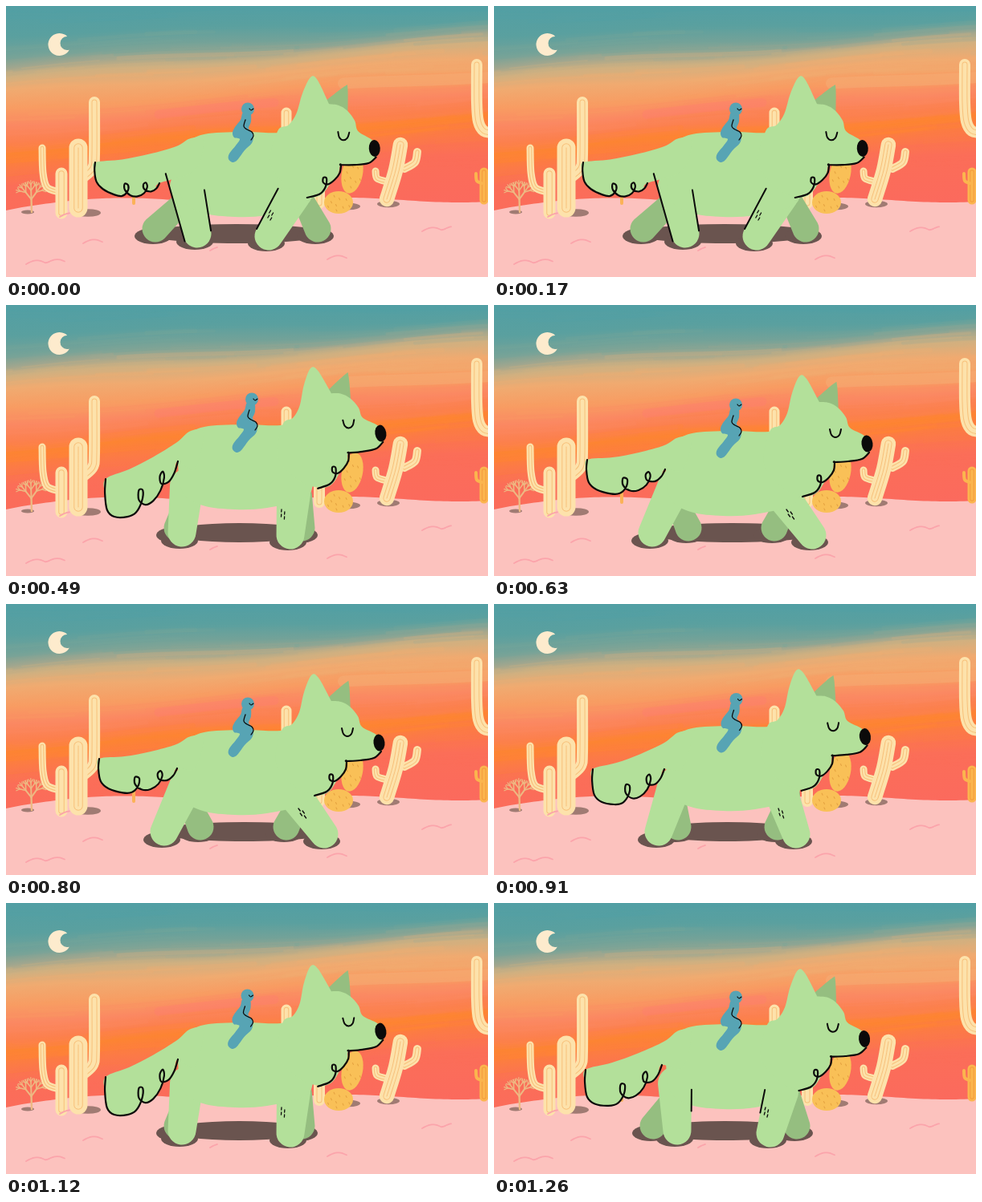
Write an HTML page with a canvas that moves like this. It is 600x338 px and loops after 1470 ms.

```html
<!DOCTYPE html>
<html lang="en">
<head>
<meta charset="utf-8">
<title>Desert ride</title>
<style>
html, body { margin: 0; height: 100%; overflow: hidden; background: #fcc2be; }
canvas { display: block; width: 100vw; height: 100vh; }
</style>
</head>
<body>
<canvas id="stage"></canvas>
<script>
const W = 600, H = 338;
const GREEN = '#b3e09a', SHADE = '#95be80', INK = '#0b0a0a', SHADOW = '#6a544f', BLUE = '#57a4b4';
const CREAM = '#fde2ab', LINE = '#f7c07a', YELLOW = '#f9c057', GROUND = '#fcc2be', PINK = '#fba4ab';
const ratio = window.devicePixelRatio || 1;

function prepare(canvas) {
  canvas.width = W * ratio;
  canvas.height = H * ratio;
  const c = canvas.getContext('2d');
  c.scale(ratio, ratio);
  c.lineCap = c.lineJoin = 'round';
  return c;
}
const backdrop = document.createElement('canvas');
const back = prepare(backdrop), view = prepare(document.getElementById('stage'));
let c = back;

// "x y x y ..." to a list of points
function points(text) {
  const n = text.split(' ').map(Number);
  return n.filter((v, i) => i % 2 === 0).map((x, i) => [x, n[2 * i + 1]]);
}
// Smooth curve through points; a doubled point makes a corner.
function curve(list, closed) {
  const p = typeof list === 'string' ? points(list) : list, path = new Path2D(), n = p.length;
  const at = i => p[closed ? (i + n) % n : Math.max(0, Math.min(n - 1, i))];
  path.moveTo(...p[0]);
  for (let i = 0; i < (closed ? n : n - 1); i++) {
    const [a, b, d, e] = [at(i - 1), at(i), at(i + 1), at(i + 2)];
    path.bezierCurveTo(b[0] + (d[0] - a[0]) / 6, b[1] + (d[1] - a[1]) / 6,
      d[0] - (e[0] - b[0]) / 6, d[1] - (e[1] - b[1]) / 6, d[0], d[1]);
  }
  return path;
}
function fill(list, color) {
  c.fillStyle = color;
  c.fill(curve(list, true));
}
function stroke(list, color, width) {
  c.strokeStyle = color;
  c.lineWidth = width;
  c.stroke(curve(list));
}
function oval(x, y, rx, ry, color, turn = 0) {
  c.fillStyle = color;
  c.beginPath();
  c.ellipse(x, y, rx, ry, turn, 0, 7);
  c.fill();
}
let seed = 7;
function rnd() {
  seed = (seed * 16807) % 2147483647;
  return seed / 2147483647;
}

// Sky colours by height at mid-stage; the bands sink to the left and rise to the right.
const sky = [[0, '#529fa4'], [26, '#5aa09f'], [44, '#74a298'], [56, '#a0a68e'], [68, '#d0b080'],
  [86, '#f0aa70'], [108, '#f89c62'], [127, '#fb8862'], [146, '#fc804e'], [160, '#fd8432'],
  [181, '#fc7a46'], [206, '#fb6e58'], [260, '#fb6a5d']];
const bend = (y, x) => y + 22 * Math.min(1, y / 60) * (1 - 2 * x / W) + 3 * Math.sin(x / 70 + y / 20);

function brush(y, x, length, color, width, alpha) {
  const line = [];
  for (let d = 0; d <= length; d += 12) line.push([x + d, bend(y, x + d)]);
  c.globalAlpha = alpha;
  stroke(line, color, width);
  c.globalAlpha = 1;
}
function paintSky() {
  for (let x = 0; x < W; x += 2) {
    const g = c.createLinearGradient(0, 0, 0, H);
    for (const [y, color] of sky) g.addColorStop(Math.max(0, bend(y, x)) / H, color);
    c.fillStyle = g;
    c.fillRect(x, 0, 2, H);
  }
  for (let i = 0; i < 220; i++) {
    const [y, color] = sky[Math.floor(rnd() * sky.length)];
    brush(y + (rnd() - 0.5) * 26, rnd() * 700 - 100, 60 + rnd() * 180, color, 1.5 + rnd() * 5, 0.25);
  }
  brush(126, 190, 150, '#fc7d6e', 11, 0.4);
  brush(108, 420, 190, '#f3b27a', 14, 0.4);
}

function stem(path, w, color = CREAM, line = LINE) {
  stroke(path, color, w);
  stroke(path, line, w * 0.5);
  stroke(path, color, w * 0.5 - 2);
  if (w > 18) stroke(path, line, 1);
}
function branch(x, y, angle, length, depth) {
  const x2 = x + length * Math.cos(angle), y2 = y + length * Math.sin(angle);
  stroke([[x, y], [x2, y2]], '#edb983', 1.2 + depth * 0.4);
  if (depth) for (const turn of [-0.65, 0, 0.65]) branch(x2, y2, angle + turn, length * 0.68, depth - 1);
}
function pad(x, y, rx, ry, turn) {
  oval(x, y, rx, ry, YELLOW, turn);
  for (let i = 1; i < 10; i++) {
    const a = i * 2.4, r = Math.sqrt(i / 10) * 0.85;
    const px = x + rx * r * Math.cos(a), py = y + ry * r * Math.sin(a);
    stroke([[px, py], [px + 1, py + 2]], '#e5a342', 1.1);
  }
}
function squiggle(x, y, width) {
  const line = [];
  for (let d = 0; d <= width; d += 3) line.push([x + d, y - 4 * Math.abs(Math.sin(d / 8)) - d / 20]);
  stroke(line, PINK, 1.8);
}
function paintDesert() {
  c.fillStyle = '#fdebcd';
  c.beginPath();
  c.arc(66.5, 48, 14, 0.48, -0.8);
  c.arc(76, 46.5, 8.5, -1.54, 1.22, true);
  c.fill();

  c.fillStyle = GROUND;
  c.beginPath();
  for (let x = 0; x <= W; x += 5) c.lineTo(x, 242 + 10 * Math.exp(-x / 45) + 3 * Math.sin(x / 45 + 1.6));
  c.lineTo(W, H);
  c.lineTo(0, H);
  c.fill();

  for (const [x, y, r] of [[27, 257, 8], [102, 258, 16], [427, 250, 14], [476, 247, 14]])
    oval(x, y, r, r * 0.3, '#a07b73');
  branch(32, 257, -1.6, 16, 3);

  stem('110 120 110 185 108 202 98 212', 14);
  stem('45 177 46 208 51 226 66 232', 9);
  stem('69 209 69 258', 15);
  stem('90 177 90 252', 23);
  stroke('159 228 159 246', '#fbb257', 4);

  stem('349 133 349 190', 13);
  stem('390 195 390 246', 14);
  pad(431, 209, 13, 25, 0.2);
  pad(414, 245, 18, 14, 0);

  stem('460 206 462 215 474 219', 9);
  stem('512 182 509 195 496 203', 10);
  stem('491 173 485 205 474 241', 18.5);
  stem('586 73 586 120 588 144 595 156 608 158', 14);
  stem('595 207 595 242', 11, '#fbb54e', '#f39a3c');
  stroke('585 209 586 218 592 221', '#fbb54e', 4);

  for (const mark of [[67, 263, 12], [96, 296, 24], [25, 322, 50], [518, 281, 38], [400, 316, 26], [254, 305, 11]])
    squiggle(...mark);
}

// Feet: x of near hind, far hind, near front, far front. Head: ear tip and tilt.
const poses = {
  stretch: { lift: 0, feet: [238, 186, 327, 388], head: [380, 89, 0.055], tip: [111, 195], root: [191, 221], ink: 1 },
  step: { lift: -6, feet: [228, 198, 344, 377], head: [379, 84, 0.017], tip: [114, 208], root: [209, 202], ink: 0.6 },
  stand: { lift: -8, feet: [219, 213, 354, 368], head: [380, 79, -0.035], tip: [124, 217], root: [214, 195], ink: 0 },
  reach: { lift: 0, feet: [197, 242, 396, 349], head: [381, 89, 0], tip: [116, 193], root: [213, 205], ink: 0 },
  pass: { lift: -5, feet: [205, 229, 376, 353], head: [377, 83, -0.017], tip: [123, 206], root: [212, 206], ink: 0 }
};

function limb([x1, y1, r1], [x2, y2, r2], color) {
  const a = Math.atan2(y2 - y1, x2 - x1), q = Math.PI / 2;
  c.fillStyle = color;
  c.beginPath();
  c.arc(x1, y1, r1, a + q, a - q);
  c.arc(x2, y2, r2, a - q, a + q);
  c.fill();
}
// Line along one side of a limb, from part t0 to part t1 of its length.
function edge([x1, y1, r1], [x2, y2, r2], side, t0, t1) {
  const a = Math.atan2(y2 - y1, x2 - x1) + side * Math.PI / 2;
  const at = t => {
    const r = r1 + (r2 - r1) * t;
    return [x1 + (x2 - x1) * t + r * Math.cos(a), y1 + (y2 - y1) * t + r * Math.sin(a)];
  };
  stroke([at(t0), at(t1)], INK, 2);
}

function drawShadow(feet) {
  const lo = Math.min(...feet), hi = Math.max(...feet);
  oval((lo + hi) / 2, 284, (hi - lo) / 2 + 10, 12, SHADOW);
  feet.forEach((x, i) => oval(x - 3, i % 2 ? 287 : 294 + i, 23, 10, SHADOW));
}

// Scalloped underside of the tail: part of the way from tip to root, and drop.
const frill = points('0 0 -.01 13 .02 29 .12 37 .3 40 .42 38 .5 29 .515 19 .46 18 .46 27 .55 33 .66 31 .76 23 .81 12 .79 6 .75 10 .77 17 .87 17 .95 10 1 0');
function drawTail({ tip, root, lift }) {
  const run = root[0] - tip[0], rise = root[1] - tip[1], deep = 1.1 - rise * 0.011;
  const under = frill.map(([u, v]) => [tip[0] + run * u, tip[1] + rise * u + v * deep]);
  const hip = [212, 175 + lift * 0.4];
  const top = t => [tip[0] + (hip[0] - tip[0]) * t, tip[1] + (hip[1] - tip[1]) * t + 3];
  fill([...under, [235, 205], [246, 168 + lift], [230, 165 + lift], hip, top(0.67), top(0.33)], GREEN);
  stroke(under, INK, 2.2);
}

function drawHead([x, y, tilt]) {
  c.save();
  c.translate(x, y);
  c.rotate(tilt);
  fill('20 28 20 28 42 9 46 11 48 45 48 45 24 45', SHADE);
  fill('-38 69 -25 61 -16 46 -10 21 -1 0 8 3 24 32 24 32 36 33 47 39 57 51 62 64 80 74 87 85 84 97 72 104 55 107 43 107 40 119 31 131 24 142 16 148 4 149 -20 140 -45 110', GREEN);
  stroke('86 95 77 103 60 106 43 107 43 107 42 117 36 126 28 132 22 130 22 124 26 125 25 136 18 145 3 150', INK, 2.2);
  oval(83.5, 84, 7, 10.5, INK, -0.12);
  stroke('37 66 39 73 44 76 49 73 51 66', INK, 2);
  c.restore();
}

function drawWolf(p) {
  const [nearHind, farHind, nearFront, farFront] = p.feet;
  const hind = [[225, 225, 21], [nearHind, 284, 17.5]], front = [[358, 236, 21], [nearFront, 287, 17.5]];
  drawShadow(p.feet);
  limb([225, 240, 13], [farHind, 278, 16.5], SHADE);
  limb([368, 238, 13], [farFront, 278, 16.5], SHADE);
  limb(...hind, GREEN);
  limb(...front, GREEN);
  const torso = points('214 205 216 182 230 167 252 159 300 157 342 158 375 150 382 190 382 232 370 250 325 261 285 263 245 258 220 242');
  fill(torso.map(([x, y]) => [x, y + p.lift]), GREEN);
  drawTail(p);
  drawHead(p.head);

  if (p.ink) {
    edge(...hind, -1, 0.15, p.ink);
    edge(...front, 1, 0.05, p.ink);
  }
  if (p.ink === 1) edge(...hind, 1, -0.35, 1.1);
  const mx = (358 + nearFront) / 2 - 13, lean = (nearFront - 358) / 17;
  for (let i = 0; i < 4; i++) {
    const x = mx + (i % 2) * 4 + lean * i / 2, y = 255 + i * 3;
    stroke([[x, y], [x + lean, y + 3]], INK, 1.3);
  }
}

function drawRider(dx, dy) {
  c.save();
  c.translate(dx, dy);
  fill('295 133 292 142 285 151 282 158 284 164 291 166 286 174 278 184 277 191 282 195 288 192 297 180 306 171 308 162 305 156 302 152 305 144 304 133', BLUE);
  oval(301, 128.5, 8, 8, BLUE);
  stroke('303 128 305 130 308 128', INK, 1.1);
  stroke('298 142 296 150 300 154 306 157 308 162 305 167', INK, 1.3);
  c.restore();
}

// Pose, hold in ms, rider shift.
const steps = [
  ['stretch', 280, 0, 0], ['step', 210, 6.5, -7], ['stand', 140, 5, -11], ['reach', 280, 0, -4],
  ['pass', 210, 0.5, -9.5], ['stand', 140, -0.5, -13], ['step', 210, 0, -11]
];
const loop = steps.reduce((sum, s) => sum + s[1], 0);

paintSky();
paintDesert();
c = view;

let shown = -1;
function tick() {
  let t = performance.now() % loop, i = 0;
  while (t >= steps[i][1]) t -= steps[i++][1];
  if (i !== shown) {
    shown = i;
    const [pose, , dx, dy] = steps[i];
    c.drawImage(backdrop, 0, 0, W, H);
    drawWolf(poses[pose]);
    drawRider(dx, dy);
  }
  requestAnimationFrame(tick);
}
tick();
</script>
</body>
</html>
```
